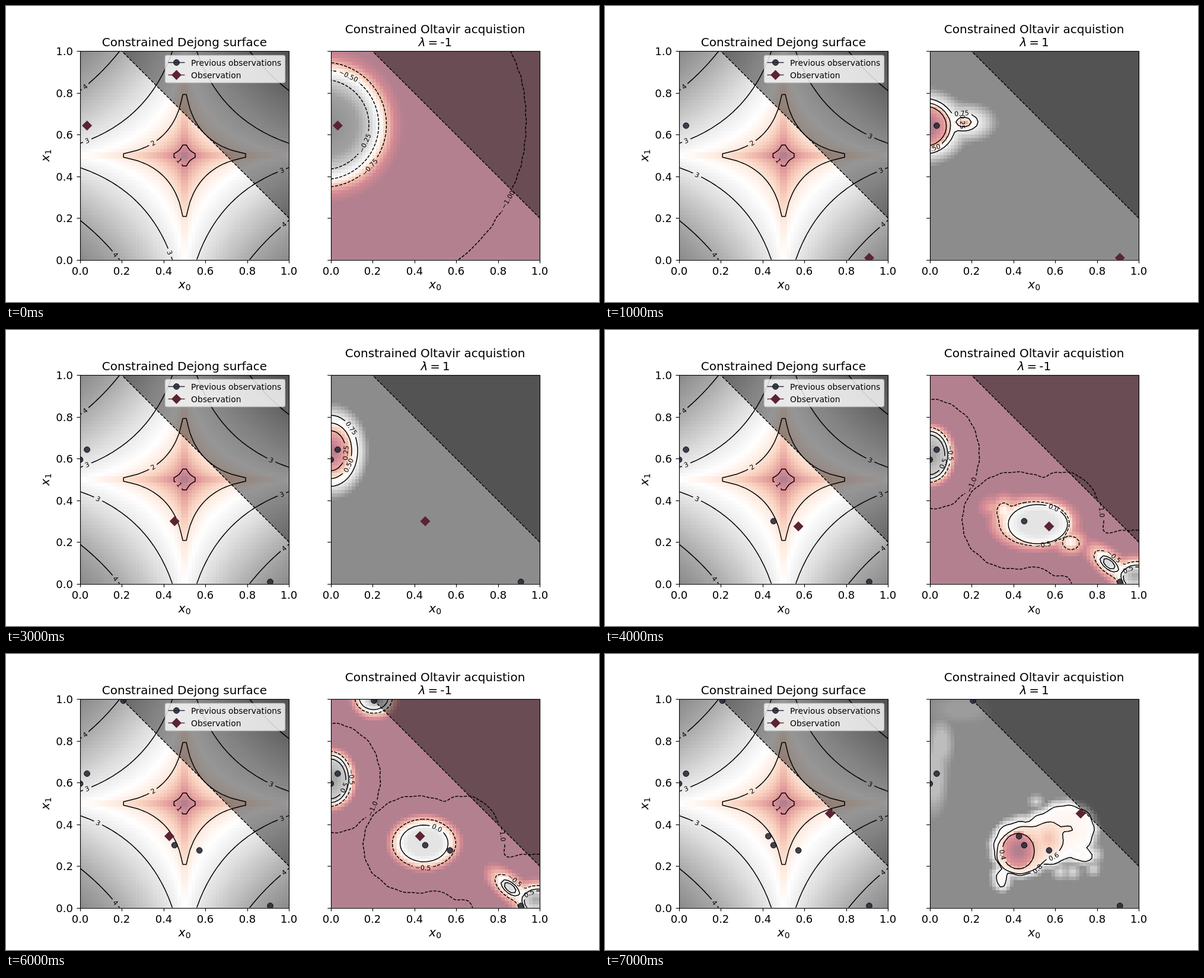
Animation, 1000 px wide and 500 px high, one loop 8000 ms. Source, as an HTML page with a canvas:

```html
<!DOCTYPE html>
<html lang="en">
<head>
<meta charset="utf-8">
<title>Constrained optimisation</title>
<style>
html, body { margin: 0; width: 100%; height: 100%; overflow: hidden; background: #fff; }
canvas { display: block; width: 1000px; height: 500px; }
</style>
</head>
<body>
<canvas id="stage" width="1000" height="500"></canvas>
<script>
const ctx = document.getElementById('stage').getContext('2d');
const SIZE = 352.27, TOP = 76.36, BOTTOM = TOP + SIZE, LEFT = 125, RIGHT = 547.73;
const N = 60, STEP = SIZE / (N - 1);
const FONT = '"DejaVu Sans", sans-serif', DASH = [5.14, 2.22];
const WINE = '#5b2333', NIGHT = '#272838';
const lerp = (a, b, u) => a + (b - a) * u;
const grid = f => Array.from({ length: N }, (_, j) => Array.from({ length: N }, (_, i) => f(i, j)));

// Red to grey map at half opacity on white
const STOPS = ['67001f', 'b2182b', 'd6604d', 'f4a582', 'fddbc7', 'ffffff', 'e0e0e0', 'bababa', '878787', '4d4d4d', '1a1a1a']
  .map(h => [0, 2, 4].map(i => (255 + parseInt(h.slice(i, i + 2), 16)) / 2));
function colour(t) {
  const s = Math.min(1, Math.max(0, t)) * 10, i = Math.min(9, Math.floor(s));
  return STOPS[i].map((c, k) => lerp(c, STOPS[i + 1][k], s - i));
}

function heatmap(values) {
  const cv = document.createElement('canvas');
  cv.width = cv.height = N;
  const c = cv.getContext('2d'), img = c.createImageData(N, N);
  values.flat().forEach((t, k) => img.data.set([...colour(t), 255], 4 * k));
  c.putImageData(img, 0, 0);
  return cv;
}

// Marching squares; segments keep the high side on one hand so they chain up
function contour(v, level, x0) {
  const next = new Map();
  for (let j = 0; j < N - 1; j++) for (let i = 0; i < N - 1; i++) {
    const c = [[i, j], [i + 1, j], [i + 1, j + 1], [i, j + 1]], hits = [];
    c.forEach((a, n) => {
      const b = c[(n + 1) % 4], fall = v[a[1]][a[0]] > level;
      if (fall === v[b[1]][b[0]] > level) return;
      const [p, q] = fall ? [a, b] : [b, a], vp = v[p[1]][p[0]], u = (vp - level) / (vp - v[q[1]][q[0]]);
      hits.push({ fall, at: [x0 + STEP * lerp(p[0], q[0], u), TOP + STEP * lerp(p[1], q[1], u)].map(z => +z.toFixed(2)) });
    });
    hits.forEach((h, n) => h.fall && next.set(h.at.join(), hits[(n + 1) % hits.length].at));
  }
  const ends = new Set([...next.values()].map(p => p.join()));
  const keys = [...next.keys()], lines = [];
  for (const k of [...keys.filter(q => !ends.has(q)), ...keys]) {
    if (!next.has(k)) continue;
    const pts = [k.split(',').map(Number)];
    for (let q = k; next.has(q);) {
      const p = next.get(q);
      next.delete(q);
      pts.push(p);
      q = p.join();
    }
    lines.push(pts);
  }
  return lines;
}

// Puts a label on the nearest point of a curve, along its direction
function place(lines, [str, x, y]) {
  let best = 1e9, spot;
  for (const l of lines) l.forEach((p, i) => {
    const d = Math.hypot(p[0] - x, p[1] - y);
    if (d >= best) return;
    const a = l[Math.max(0, i - 1)], b = l[Math.min(l.length - 1, i + 1)];
    best = d;
    spot = { str, x: p[0], y: p[1], turn: Math.atan((b[1] - a[1]) / (b[0] - a[0] || 1e-6)) };
  });
  return spot;
}
function curve(v, level, x0, dash, labels) {
  const lines = contour(v, level, x0);
  return { lines, dash, labels: labels.map(l => place(lines, l)).filter(Boolean) };
}

// A group is a smooth union of ellipses [x, y, rx, ry, degrees].
// Its ramp lists [distance, tone, contour text, label x, label y] from outside in.
const group = (blobs, ramp, rough = 0) => ({ blobs, ramp, rough });

function distance(x, y, { blobs, rough }) {
  let sum = 0;
  for (const [cx, cy, rx, ry, deg = 0] of blobs) {
    const a = deg * Math.PI / 180, dx = x - cx, dy = y - cy;
    const u = dx * Math.cos(a) + dy * Math.sin(a), w = dy * Math.cos(a) - dx * Math.sin(a);
    sum += Math.exp((1 - Math.hypot(u / rx, w / ry)) * Math.min(rx, ry) / 3);
  }
  return -3 * Math.log(sum + 1e-30) + rough * (Math.sin(x / 4.5) + Math.sin(y / 4));
}

function tone(d, ramp) {
  const k = ramp.findIndex(r => d >= r[0]);
  if (k === 0) return ramp[0][1];
  if (k < 0) return ramp[ramp.length - 1][1];
  const [a, b] = [ramp[k - 1], ramp[k]];
  return lerp(a[1], b[1], (d - a[0]) / (b[0] - a[0]));
}

function acquisition({ sign, groups }) {
  const base = sign > 0 ? 1 : 0;
  const fields = groups.map(g => grid((i, j) => distance(RIGHT + i * STEP, TOP + j * STEP, g)));
  const values = grid((i, j) => groups.reduce((m, g, k) => {
    const t = tone(fields[k][j][i], g.ramp);
    return Math.abs(t - base) > Math.abs(m - base) ? t : m;
  }, base));
  const curves = groups.flatMap((g, k) => g.ramp.filter(r => r[2]).map(([d, , str, x, y]) =>
    curve(fields[k], d, RIGHT, str[0] === '−', x ? [[str, x, y]] : [])));
  return { img: heatmap(values), curves };
}

// Observations and acquisition states
const OBS = [[.033, .643], [.91, .009], [0, .595], [.452, .3], [.571, .275], [.207, .993], [.427, .343], [.722, .452]];

const edge = (blobs, text, x, y) => group(blobs, [[0, 0, text, x, y]], .8);
const glow = (t, ...blobs) => group(blobs, [[7, 1], [-8, t]]);
const shore = group([[547, 211, 31, 40]], [[14, 0], [5, .25, '−0.5', 585, 207], [0, .53, '0.0'], [-5, .75, '0.5', 572, 230], [-25, .9]]);
const corner = group([[850, 395, 31, 15, 40], [897, 418, 34, 27]],
  [[12, 0], [0, .25, '−0.5', 864, 380], [-6, .53, '0.0'], [-9, .66, '0.5', 882, 398], [-26, .9]]);
const coast = edge([[550, 210, 82, 92]], '−1.0', 612, 257);
const sea = edge([[692, 322, 90, 82], [772, 328, 68, 88], [885, 420, 98, 82]], '−1.0', 842, 303);

const STATES = [
  { sign: -1, groups: [
    group([[536, 200.5, 92.5, 92.5]], [[42, 0], [26, .08], [13, .25, '−0.75', 613, 269], [0, .5, '−0.50', 575, 118], [-16.5, .75, '−0.25', 602, 232], [-40, .92], [-75, .98]]),
    edge([[580, 195, 297, 297]], '−1.00', 840, 327)] },

  { sign: 1, groups: [
    group([[538, 203, 52, 47], [605, 196, 24, 15]], [[22, 1], [0, .62, '0.75', 602, 173], [-7, .42, '0.50', 553, 242], [-13, .2, '0.25', 591, 197], [-34, 0]])] },

  { sign: -1, groups: [
    group([[551, 210.5, 47, 43]], [[15, 0], [4, .25, '−0.5', 595, 227], [-4, .53, '0.0', 566, 173], [-12, .66]]),
    group([[906, 432, 33, 38]], [[13, 0], [5, .25, '−0.5', 884, 404], [0, .53, '0.0', 880, 410], [-5, .75, '0.5', 885, 409], [-25, .95]]),
    edge([[555, 213, 109, 107]], '−1.0', 625, 287),
    edge([[905, 432, 96, 98]], '−1.0', 834, 369)] },

  { sign: 1, groups: [
    group([[547, 204, 36, 47]], [[28, 1], [10, .62, '0.75', 583, 166], [0, .42, '0.50', 577, 230], [-10, .2, '0.25', 573, 205], [-32, 0]])] },

  { sign: -1, groups: [shore, corner, coast, sea,
    group([[724, 327, 59, 37], [786, 360, 14, 11], [672, 306, 11, 14]], [[16, 0], [0, .25, '−0.5', 739, 364], [-8, .45]]),
    group([[730, 328, 50, 33]], [[12, 0], [0, .53, '0.0', 757, 300], [-12, .66]]),
    group([[652, 300, 16, 14]], [[10, 0], [-10, .17]])] },

  { sign: 1, groups: [
    group([[714, 325, 52, 38], [772, 323, 31, 20], [667, 332, 9, 8]], [[15, 1], [0, .6, '0.75', 728, 285], [-8, .5], [-30, .46]], .7),
    group([[716, 325, 47, 34]], [[8, 1], [0, .4, '0.50', 675, 325], [-25, .27]]),
    group([[702, 319, 25, 23]], [[9, 1], [0, .17, '0.25', 697, 343], [-20, .02]]),
    group([[640, 290, 5, 7], [664, 282, 6, 6]], [[8, 1], [0, .62, '0.75']]),
    glow(.72, [800, 264, 12, 12], [813, 374, 13, 13], [794, 387, 9, 9], [768, 367, 14, 11], [808, 342, 14, 20]),
    glow(.85, [555, 190, 26, 72]),
    glow(.95, [620, 76, 45, 25])] },

  { sign: -1, groups: [shore, corner, coast, sea,
    group([[705, 320, 47, 36]], [[16, 0], [5, .25, '−0.5', 705, 360], [-5, .53, '0.0', 725, 293], [-14, .66]]),
    group([[620, 74, 28, 23]], [[14, 0], [3, .25, '−0.5'], [-3, .53, '0.0'], [-18, .85]])] },

  { sign: 1, groups: [
    group([[700, 328, 45, 45], [745, 314, 46, 42], [778, 296, 47, 41], [806, 340, 16, 10], [668, 380, 9, 12]],
      [[13, 1], [0, .56, '0.8', 733, 366], [-6, .47], [-30, .44]], .9),
    group([[705, 331, 46, 38, -25], [748, 313, 25, 30], [779, 295, 9, 4]], [[8, 1], [0, .39, '0.6', 757, 346], [-25, .24]], .5),
    group([[697, 333, 27, 30]], [[9, 1], [0, .16, '0.4', 670, 339], [-20, 0]]),
    glow(.72, [727, 249, 9, 8], [825, 365, 9, 9], [768, 370, 10, 10], [790, 370, 10, 10], [828, 340, 11, 12]),
    glow(.82, [552, 205, 20, 58], [564, 150, 18, 35]),
    glow(.94, [600, 90, 42, 20])] }
];

// Test surface: sum of root distances from the centre
const root = i => Math.sqrt(Math.abs(10 * i / (N - 1) - 5));
const dejong = grid((i, j) => root(i) + root(j));
const LOW = 2 * root(N / 2), HIGH = 2 * root(0);
const surface = heatmap(dejong.map(r => r.map(v => (v - LOW) / (HIGH - LOW))));
const MARKS = [['4', 133, 135], ['3', 137, 227], ['2', 248, 231], ['3', 465, 277], ['4', 187, 420], ['4', 468, 368], ['1', 293, 261]];
const levels = extra => [1, 2, 3, 4].map(l =>
  curve(dejong, l, LEFT, false, [...MARKS, ...extra].filter(m => +m[0] === l)));
const FIRST = levels([['3', 278, 416]]), LATER = levels([['3', 448, 219], ['3', 157, 284]]);

// Drawing helpers
function text(str, x, y, size, align = 'center', style = '') {
  ctx.font = `${style} ${size}px ${FONT}`;
  ctx.textAlign = align;
  ctx.fillStyle = '#000';
  ctx.fillText(str, x, y);
}

function turned(x, y, angle, draw) {
  ctx.save();
  ctx.translate(x, y);
  ctx.rotate(angle);
  draw();
  ctx.restore();
}

function segment(x1, y1, x2, y2) {
  ctx.beginPath();
  ctx.moveTo(x1, y1);
  ctx.lineTo(x2, y2);
  ctx.stroke();
}

function strokeCurve({ lines, dash, labels }) {
  ctx.save();
  ctx.font = `11.1px ${FONT}`;
  for (const { str, x, y, turn } of labels) {
    const w = ctx.measureText(str).width + 8;
    ctx.beginPath();
    ctx.rect(0, 0, 1000, 500);
    ctx.translate(x, y);
    ctx.rotate(turn);
    ctx.rect(-w / 2, -6, w, 12);
    ctx.resetTransform();
    ctx.clip('evenodd');
  }
  ctx.lineWidth = 1.5;
  ctx.lineJoin = 'round';
  ctx.setLineDash(dash ? DASH : []);
  ctx.beginPath();
  for (const l of lines) l.forEach((p, i) => i ? ctx.lineTo(...p) : ctx.moveTo(...p));
  ctx.stroke();
  ctx.restore();
}

function dot(x, y) {
  ctx.globalAlpha = .88;
  ctx.fillStyle = NIGHT;
  ctx.strokeStyle = '#000';
  ctx.lineWidth = 1;
  ctx.beginPath();
  ctx.arc(x, y, 4.9, 0, 7);
  ctx.fill();
  ctx.stroke();
  ctx.globalAlpha = 1;
}

function diamond(x, y) {
  ctx.fillStyle = WINE;
  ctx.beginPath();
  [[0, -8.5], [8.5, 0], [0, 8.5], [-8.5, 0]].forEach(([a, b]) => ctx.lineTo(x + a, y + b));
  ctx.fill();
}

function variable(x, y, sub) {
  text('x', x, y, 20, 'left', 'italic');
  text(sub, x + 12, y + 3, 14, 'left');
}

function panel(x0, img, curves, count) {
  ctx.save();
  ctx.beginPath();
  ctx.rect(x0, TOP, SIZE, SIZE);
  ctx.clip();
  ctx.imageSmoothingEnabled = false;
  ctx.drawImage(img, x0, TOP, SIZE, SIZE);

  // Infeasible corner
  ctx.fillStyle = 'rgba(0,0,0,.41)';
  ctx.beginPath();
  ctx.moveTo(x0 + .2 * SIZE, TOP);
  ctx.lineTo(x0 + SIZE, TOP);
  ctx.lineTo(x0 + SIZE, TOP + .8 * SIZE);
  ctx.fill();
  ctx.strokeStyle = '#000';
  ctx.lineWidth = 1.39;
  ctx.setLineDash(DASH);
  segment(x0, TOP - .2 * SIZE, x0 + SIZE, TOP + .8 * SIZE);
  ctx.setLineDash([]);

  curves.forEach(strokeCurve);
  for (const { str, x, y, turn } of curves.flatMap(c => c.labels)) turned(x, y, turn, () => text(str, 0, 4, 11.1));
  OBS.slice(0, count + 1).forEach(([u, v], i) => (i < count ? dot : diamond)(x0 + u * SIZE, BOTTOM - v * SIZE));
  ctx.restore();

  // Frame and ticks
  ctx.strokeStyle = '#000';
  ctx.lineWidth = 1.15;
  ctx.strokeRect(Math.round(x0) + .5, 76.5, 352, 353);
  for (let i = 0; i <= 5; i++) {
    const x = Math.round(x0 + i * SIZE / 5) + .5, y = Math.round(BOTTOM - i * SIZE / 5) + .5, str = (i / 5).toFixed(1);
    segment(x, 429, x, 434.5);
    segment(x0, y, x0 - 5.5, y);
    text(str, x - .5, 454, 18.05);
    if (x0 === LEFT) text(str, 113, y + 6, 18.05, 'right');
  }
  variable(x0 + SIZE / 2 - 10.5, 477, '0');
}

function legend() {
  ctx.beginPath();
  ctx.roundRect(268.5, 83.5, 202, 46, 3);
  ctx.fillStyle = 'rgba(255,255,255,.8)';
  ctx.fill();
  ctx.strokeStyle = 'rgba(204,204,204,.8)';
  ctx.lineWidth = 1.3;
  ctx.stroke();
  [['Previous observations', 95.5, NIGHT, dot], ['Observation', 116.5, WINE, diamond]].forEach(([str, y, col, mark]) => {
    ctx.strokeStyle = col;
    ctx.lineWidth = 1.4;
    segment(273.5, y, 301.5, y);
    mark(287.5, y);
    text(str, 312, y + 5, 13.89, 'left');
  });
}

function render(n) {
  const s = STATES[n];
  s.plot = s.plot || acquisition(s);
  ctx.fillStyle = '#fff';
  ctx.fillRect(0, 0, 1000, 500);

  panel(LEFT, surface, n ? LATER : FIRST, n);
  legend();
  panel(RIGHT, s.plot.img, s.plot.curves, n);

  turned(73, 263, -Math.PI / 2, () => variable(0, 0, '1'));
  text('Constrained Dejong surface', 301, 68, 20);
  text('Constrained Oltavir acquistion', 723.6, 46, 20);
  const x = s.sign < 0 ? 695.8 : 699.5;
  text('λ', x, 68, 20, 'left', 'italic');
  text('=', x + 15.7, 68, 20, 'left');
  text(s.sign < 0 ? '-1' : '1', x + 36.4, 68, 20, 'left');
}

let shown = -1;
const start = performance.now();
function tick() {
  const n = Math.floor((performance.now() - start) % 8000 / 1000);
  if (n !== shown) render(shown = n);
  requestAnimationFrame(tick);
}
tick();
</script>
</body>
</html>
```
